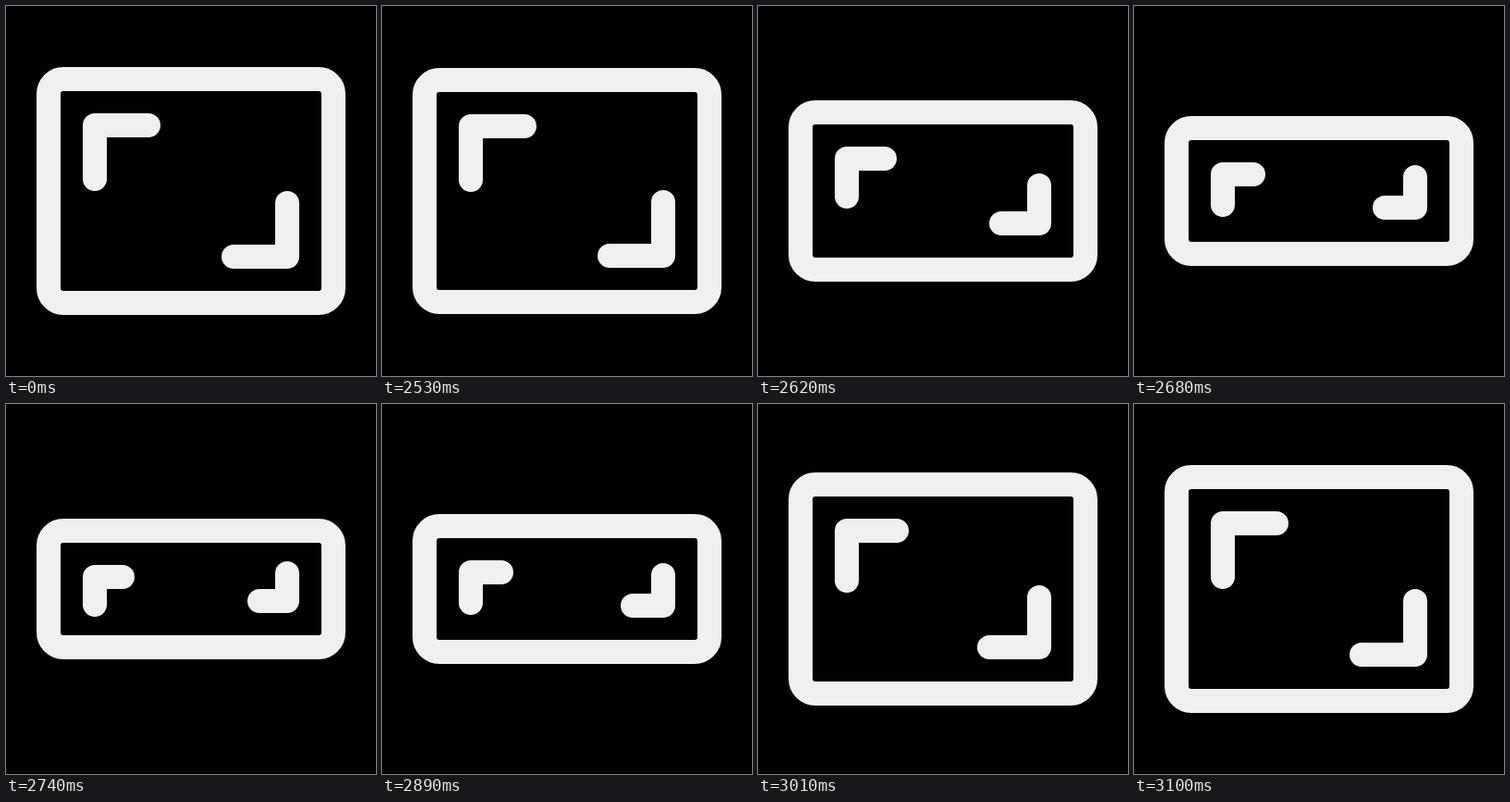
An HTML page for the animation above (3130 ms loop, 400 by 400 pixels).

```html
<!DOCTYPE html>
<html>
<head>
<meta charset="utf-8">
<style>
  html, body { margin: 0; width: 100%; height: 100%; overflow: hidden; background: #000; }
  svg { display: block; width: 100%; height: 100%; }
</style>
</head>
<body>
<svg viewBox="0 0 400 400" fill="none" stroke="#f0f0f0" stroke-width="26" stroke-linecap="round" stroke-linejoin="round">
  <rect id="frame" x="46" width="308" rx="16"/>
  <path id="corner"/>
  <use href="#corner" transform="rotate(180 200 200)"/>
</svg>
<script>
const LOOP = 3130, START = 2530, STEP = 30, SQUEEZE = 59.4;
const frame = document.getElementById('frame');
const corner = document.getElementById('corner');

// Eased progress along cubic-bezier(x1, 0, x2, 1)
function ease(u, x1, x2) {
  if (u <= 0) return 0;
  if (u >= 1) return 1;
  let lo = 0, hi = 1, s;
  for (let i = 0; i < 24; i++) {
    s = (lo + hi) / 2;
    const r = 1 - s;
    if (3 * r * r * s * x1 + 3 * r * s * s * x2 + s * s * s < u) lo = s;
    else hi = s;
  }
  return s * s * (3 - 2 * s);
}

function inset(t) {
  if (t < START) return 0;
  t = START + Math.floor((t - START) / STEP) * STEP;
  const close = ease((t - 2507) / 283, 0.4, 0.2);
  const open = ease((t - 2836) / 280, 0.4, 0.3);
  return Math.round(SQUEEZE * (close - open));
}

function draw(now) {
  const d = inset(now % LOOP);
  const arm = 58 - Math.round(d * 0.475);
  frame.setAttribute('y', 79 + d);
  frame.setAttribute('height', 242 - 2 * d);
  corner.setAttribute('d', `M${96 + arm} ${129 + d}H96v${arm}`);
  requestAnimationFrame(draw);
}
draw(0);
</script>
</body>
</html>
```
